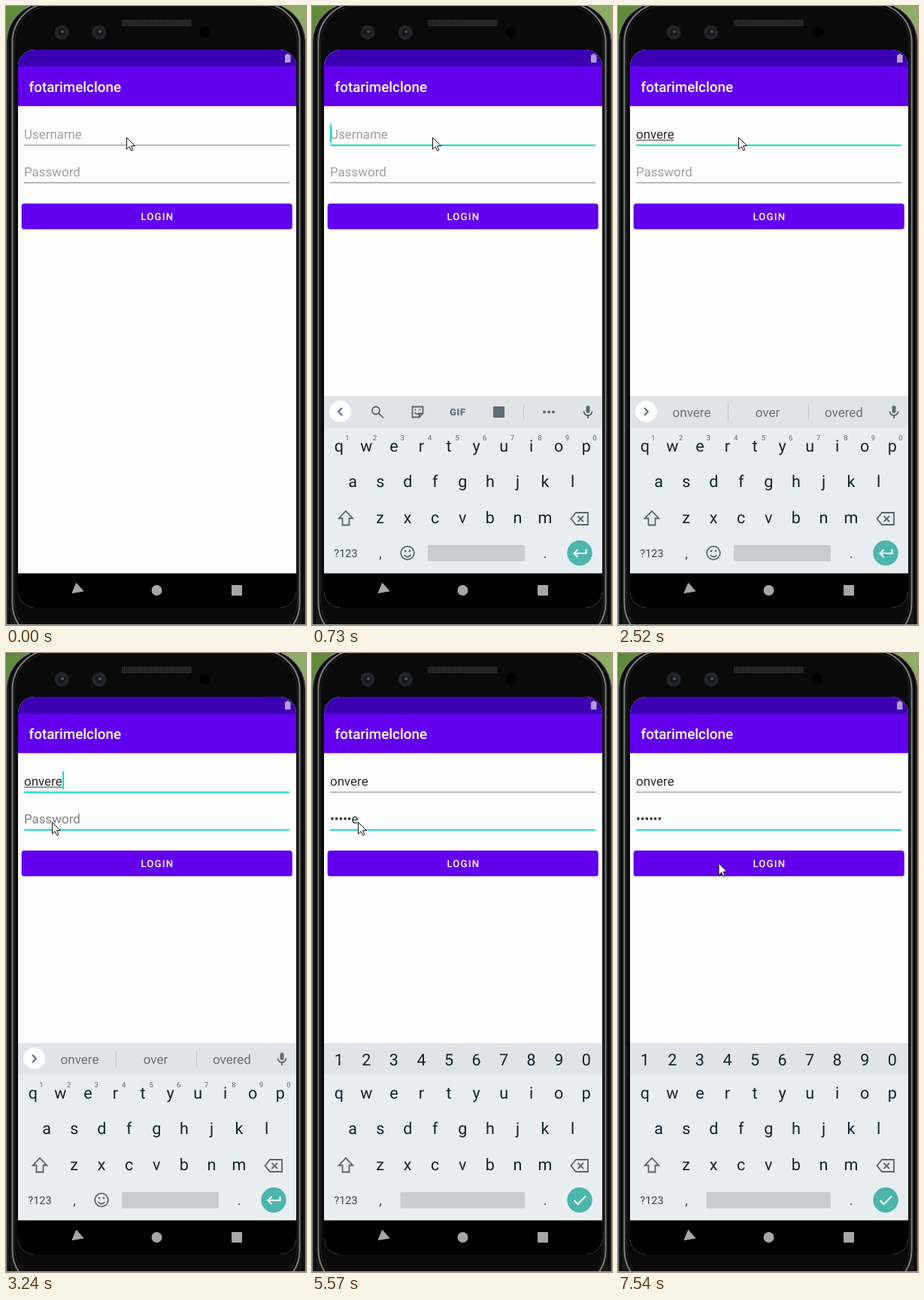
Write an HTML page that moves like this. It is 399x821 px and loops after 8 s.

```html
<!DOCTYPE html>
<html lang="en">
<head>
<meta charset="utf-8">
<title>Login screen</title>
<style>
  html, body { margin: 0; width: 100%; height: 100%; overflow: hidden; background: #0a0a0a; }
  svg { display: block; width: 399px; height: 821px; font-family: Roboto, "Noto Sans", sans-serif; text-rendering: geometricPrecision; }
  .mid { text-anchor: middle; }
  .field { font-size: 16.96px; fill: #2b2b2b; }
  .hint { fill: #9e9e9e; }
  .hint.pressed { fill: #808080; }
  .rule { fill: #858585; }
  .rule.on, .caret { fill: #03dac5; }
  .key { font-size: 21.5px; fill: #0d252e; }
  .sup { font-size: 9.5px; fill: #5c6a71; }
  .word { font-size: 17px; fill: #65727a; }
  .word.best { fill: #050a0c; font-weight: 700; }
  .line { fill: none; stroke: #56666f; stroke-width: 1.8; }
  .icon { fill: #5f6d75; }
  .nav { fill: #a6a6a6; }
</style>
</head>
<body>
<svg viewBox="0 0 399 821">
  <defs>
    <linearGradient id="grass"><stop stop-color="#5f8a3c"/><stop offset="1" stop-color="#8fae68"/></linearGradient>
    <pattern id="mesh" width="3" height="3" patternUnits="userSpaceOnUse"><rect width="3" height="3" fill="#1b1b1b"/><circle cx="1.5" cy="1.5" r="1" fill="#363636"/></pattern>
    <clipPath id="screen"><rect x="16" y="58" width="370" height="740" rx="22"/></clipPath>
    <clipPath id="button"><rect x="20.7" y="262" width="360" height="34" rx="3.5"/></clipPath>
    <filter id="soft" x="-5%" y="-30%" width="110%" height="180%"><feGaussianBlur stdDeviation="1.5"/></filter>
  </defs>

  <!-- phone body -->
  <rect width="399" height="60" fill="url(#grass)"/>
  <rect y="60" width="399" height="761" fill="#2a2a2a"/>
  <rect x=".5" y="-4" width="398" height="900" rx="52" fill="#1c1c1c" stroke="#8a8a8a"/>
  <rect x="4.5" y="-4" width="390" height="880" rx="52" fill="#181818" stroke="#050505" stroke-width="2"/>
  <rect x="8.5" y="-4" width="382" height="848" rx="52" fill="#0a0a0a" stroke="#7c7c7c" stroke-width="2"/>
  <rect x="11.5" y="0" width="376" height="838" rx="48" fill="#0a0a0a" stroke="#262626"/>
  <path d="M0 820.5h399" stroke="#a0a0a0"/>
  <rect x="154" y="18" width="93" height="9" rx="2" fill="url(#mesh)"/>
  <g id="lenses"></g>
  <circle cx="265" cy="34.5" r="7" fill="#000"/>

  <g clip-path="url(#screen)">
    <rect x="16" y="58" width="370" height="740" fill="#fefefe"/>
    <rect x="16" y="58" width="370" height="23" fill="#3a00b1"/>
    <path d="M371 65h2v-1.5h3.5V65h2v10H371z" fill="#b39ddf"/>
    <rect x="16" y="80" width="370" height="52.8" fill="#6200ee"/>
    <text x="30.5" y="114" font-size="18.84" font-weight="500" fill="#fff">fotarimelclone</text>

    <g id="form"></g>

    <rect id="shadow" x="20.5" y="263.5" width="360.5" height="34" rx="4" filter="url(#soft)"/>
    <g clip-path="url(#button)">
      <rect x="20" y="262" width="362" height="34" fill="#6200ee"/>
      <circle id="ripple" cx="140" cy="279" fill="#fff"/>
    </g>
    <text class="mid" x="201.3" y="284" font-size="13.2" font-weight="500" letter-spacing="1.18" fill="#fff">LOGIN</text>

    <g id="keyboard">
      <rect x="16" y="517.5" width="370" height="236" fill="#e8edf0"/>
      <rect x="16" y="517.5" width="370" height="42" fill="#e0e4e7"/>
      <g id="strip">
        <circle cx="37.5" cy="538.8" r="14.5" fill="#c9cdd0"/>
        <circle cx="37.5" cy="538" r="14.5" fill="#fff"/>
        <path id="chevron" class="line"/>
        <rect class="icon" x="364.5" y="530" width="5" height="10" rx="2.5"/>
        <path class="line" d="M361.5 537.5a5.5 5.5 0 0 0 11 0M367 543v4"/>
      </g>
      <g id="tools">
        <circle class="line" cx="85" cy="536.5" r="5"/>
        <path class="line" d="M88.8 540.3l6 6"/>
        <path class="line" d="M133.5 531.5h14v9l-5 5h-9zM147.5 540.5h-5v5M136.5 539q3 4 6 1"/>
        <path class="icon" d="M136 534.5h2v2h-2zM142.5 534.5h2v2h-2z"/>
        <text class="mid icon" x="194" y="542.7" font-size="12.5" font-weight="900" letter-spacing=".8">GIF</text>
        <rect class="icon" x="241" y="531" width="15" height="15"/>
        <rect x="281" y="528" width="1" height="22" fill="#c3c8cb"/>
        <g class="icon"><circle cx="309" cy="538.5" r="2"/><circle cx="315" cy="538.5" r="2"/><circle cx="321" cy="538.5" r="2"/></g>
      </g>
      <g id="words">
        <path d="M146.5 527v23M253.5 527v23" stroke="#c3c8cb"/>
      </g>
      <g id="digits"></g>
      <g id="sups"></g>
      <g id="letters"></g>
      <path class="line" d="M45 669.8l9.3 9.7h-4.8v9h-9v-9h-4.8z"/>
      <path class="line" d="M351 672h16v16h-16l-6.5-8zM353.5 676.5l7.5 7.5m0-7.5l-7.5 7.5"/>
      <text class="mid" x="45" y="731" font-size="14.5" fill="#33474f">?123</text>
      <text class="mid" x="91" y="732" font-size="18" fill="#33474f">,</text>
      <text class="mid" x="310" y="732" font-size="18" fill="#33474f">.</text>
      <g id="emoji">
        <circle class="line" cx="127" cy="725.5" r="8.8"/>
        <path class="line" d="M122.5 728q4.5 5 9 0"/>
        <circle class="icon" cx="124" cy="723" r="1.4"/><circle class="icon" cx="130" cy="723" r="1.4"/>
      </g>
      <rect id="space" y="715" height="21.5" rx="2" fill="#c8cdd0"/>
      <circle cx="356" cy="725.5" r="16.7" fill="#4db6ac"/>
      <path id="action" fill="none" stroke="#fff" stroke-width="2"/>
    </g>

    <rect x="16" y="752.5" width="370" height="46" fill="#000"/>
    <path class="nav" d="M93.5 765.5l9.5 10.5-15 2.5z" stroke="#a6a6a6" stroke-linejoin="round"/>
    <circle class="nav" cx="200.5" cy="775" r="7"/>
    <rect class="nav" x="300" y="768" width="14" height="14" rx="1"/>
  </g>

  <path id="cursor" d="M.5.5v15.5l3.6-3.4 2.5 5.2 2.3-1-2.4-5.2h5z" fill="#fff" stroke="#111"/>
</svg>

<script>
const LOOP = 8000, LEFT = 24;
const $ = id => document.getElementById(id);

function add(parent, tag, attrs, text = '') {
  const el = document.createElementNS('http://www.w3.org/2000/svg', tag);
  set(el, attrs);
  el.textContent = text;
  return parent.appendChild(el);
}
function set(el, attrs) { for (const k in attrs) el.setAttribute(k, attrs[k]); }
function show(el, on) { el.style.display = on ? '' : 'none'; }

for (const x of [74, 124]) {
  add($('lenses'), 'circle', { cx: x, cy: 35, r: 9.5, fill: '#22262a' });
  add($('lenses'), 'circle', { cx: x, cy: 35, r: 5, fill: '#14181d' });
  add($('lenses'), 'circle', { cx: x + 1, cy: 34, r: 2, fill: '#50565c' });
}

const PITCH = 36.55;
function keyRow(group, keys, x, y, cls = 'key') {
  [...keys].forEach((k, i) => add(group, 'text', { class: 'mid ' + cls, x: x + i * PITCH, y }, k));
}
keyRow($('digits'), '1234567890', 35.8, 547);
keyRow($('sups'), '1234567890', 47, 576, 'sup');
keyRow($('letters'), 'qwertyuiop', 35.8, 590.5);
keyRow($('letters'), 'asdfghjkl', 54.2, 638);
keyRow($('letters'), 'zxcvbnm', 90.6, 685.5);
const words = [98, 199, 300.5].map(x => add($('words'), 'text', { class: 'mid word', x, y: 545 }));

function makeField(label, base) {
  const g = $('form');
  return {
    hint: add(g, 'text', { class: 'field hint', x: LEFT, y: base }, label),
    text: add(g, 'text', { class: 'field', x: LEFT, y: base }),
    mark: add(g, 'rect', { x: LEFT, y: base + 1.5, height: 1, fill: '#2b2b2b' }),
    rule: add(g, 'rect', { x: LEFT, width: 353 }),
    caret: add(g, 'rect', { class: 'caret', y: base - 19, width: 2, height: 24 }),
    base
  };
}
const user = makeField('Username', 176), pass = makeField('Password', 226);

function drawField(f, value, focus, caret, composing) {
  f.text.textContent = value;
  const w = value ? f.text.getComputedTextLength() : 0;
  show(f.hint, !value);
  show(f.mark, composing && value);
  show(f.caret, caret);
  f.mark.setAttribute('width', w);
  f.caret.setAttribute('x', LEFT + w + (value ? .5 : 0));
  const height = focus ? 1.9 : 1;
  set(f.rule, { class: focus ? 'rule on' : 'rule', y: f.base + (focus ? 7.7 : 8), height });
}

const NAME = 'onvere';
const dots = n => '•'.repeat(n);
const masked = n => dots(n - 1) + NAME[n - 1];

// each step changes only what it names; the rest carries over
const steps = [
  [0, { user: '', pass: '', userOn: 0, passOn: 0, caret: '', composing: 0, pressed: 0,
        kb: 236, mode: 'tools', words: [], best: -1, x: 160, y: 174, ripple: 0, glow: 0 }],
  [370, { userOn: 1, caret: 'user' }],
  [550, { kb: 110 }],
  [730, { kb: 0 }],
  [910, { caret: '' }],
  [1470, { user: 'o', caret: 'user', composing: 1, mode: 'words', words: ['o', 'ok', 'or'], best: 1 }],
  [1650, { user: 'onv', words: ['onv', 'one', 'on'], best: -1 }],
  [1830, { user: 'onver', words: ['onver', 'over', 'never'] }],
  [2010, { user: NAME, words: [NAME, 'over', 'overed'] }],
  [2520, { caret: '' }],
  [2700, { x: 132, y: 190 }],
  [2870, { x: 82, y: 214 }],
  [3050, { x: 61, y: 224, caret: 'user' }],
  [3240, { passOn: 1, pressed: 1 }],
  [3410, { userOn: 0, composing: 0, pressed: 0, caret: 'pass' }],
  [3590, { mode: 'digits' }],
  [3960, { caret: '' }],
  [4310, { pass: masked(1), caret: 'pass' }],
  [4490, { pass: masked(2) }],
  [4670, { pass: masked(3) }],
  [4850, { pass: masked(5) }],
  [5030, { pass: masked(6) }],
  [5570, { caret: '' }],
  [5750, { x: 76, y: 237 }],
  [5930, { x: 108, y: 263 }],
  [6110, { x: 130, y: 277, caret: 'pass' }],
  [6300, { x: 133.5, y: 278.5 }],
  [6480, { pass: dots(6), caret: '' }],
  [7020, { caret: 'pass', ripple: 213, glow: .25 }],
  [7200, { ripple: 300 }],
  [7370, { glow: .1 }],
  [7540, { caret: '', ripple: 0, glow: 0 }]
];

function draw(s) {
  drawField(user, s.user, s.userOn, s.caret === 'user', s.composing);
  drawField(pass, s.pass, s.passOn, s.caret === 'pass', 0);
  pass.hint.classList.toggle('pressed', !!s.pressed);

  const digits = s.mode === 'digits';
  show($('keyboard'), s.kb < 236);
  $('keyboard').setAttribute('transform', `translate(0 ${s.kb})`);
  for (const id of ['tools', 'words', 'digits']) show($(id), s.mode === id);
  for (const id of ['strip', 'sups', 'emoji']) show($(id), !digits);
  $('chevron').setAttribute('d', s.mode === 'tools' ? 'M40 533l-5 5 5 5' : 'M35 533l5 5-5 5');
  words.forEach((w, i) => {
    w.textContent = s.words[i] || '';
    w.classList.toggle('best', i === s.best);
  });
  const left = digits ? 117.5 : 154;
  set($('space'), { x: left, width: 283 - left });
  $('action').setAttribute('d', digits ? 'M348.5 726l5 5 10.5-10.5' : 'M364.5 720.5v5.5h-16m5-5l-5 5 5 5');

  set($('ripple'), { r: s.ripple, opacity: s.glow });
  $('shadow').setAttribute('opacity', .12 + s.glow);
  $('cursor').setAttribute('transform', `translate(${s.x} ${s.y})`);
}

const start = performance.now();
let last = -1;
function tick() {
  const t = Math.max(0, performance.now() - start) % LOOP;
  const past = steps.filter(([at]) => at <= t);
  if (past.length !== last) {
    last = past.length;
    draw(Object.assign({}, ...past.map(p => p[1])));
  }
  requestAnimationFrame(tick);
}
tick();
</script>
</body>
</html>
```
